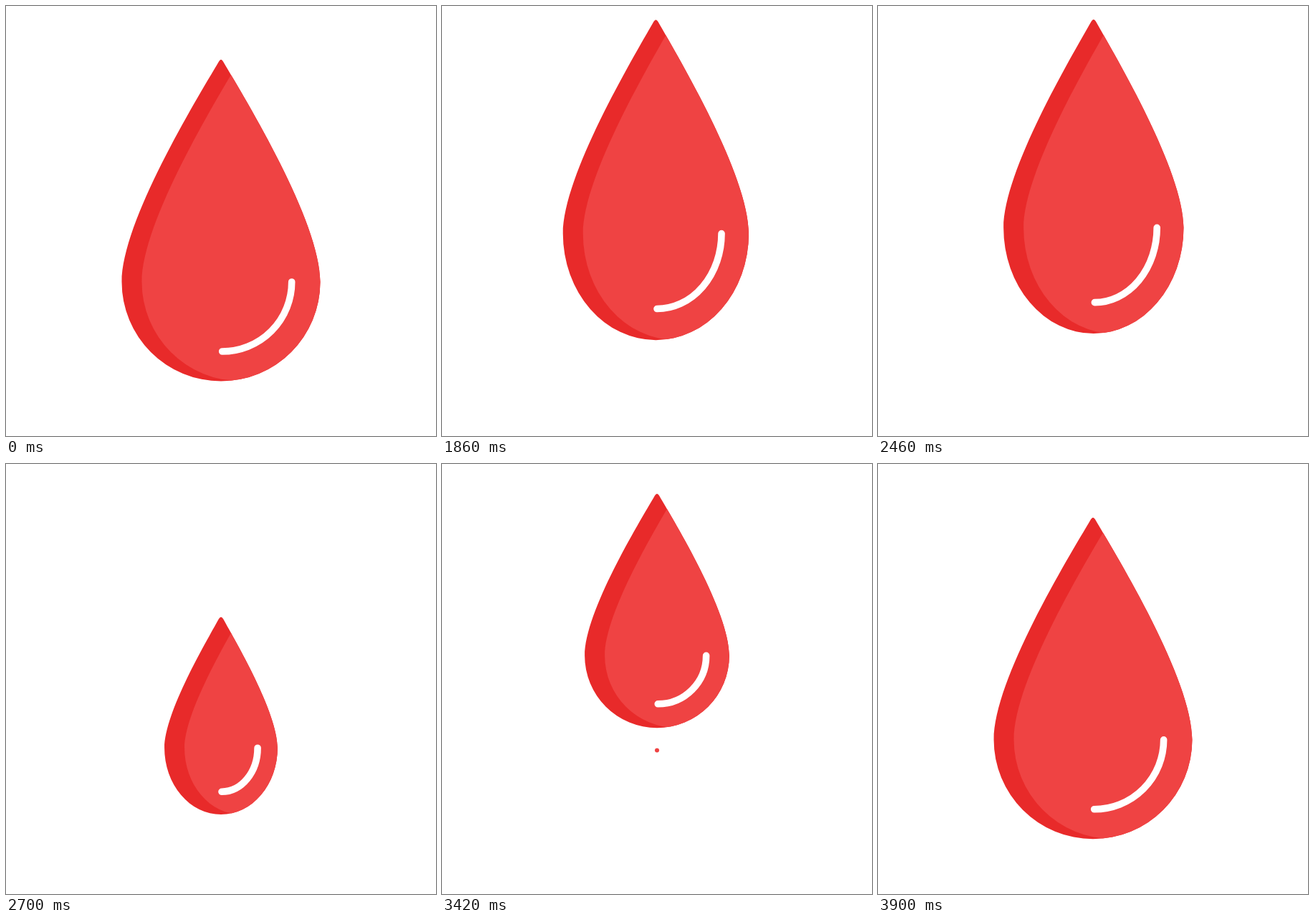
An HTML page with a canvas that plays this animation: 600 by 600 pixels, repeating every 3.93 s.

```html
<!DOCTYPE html>
<html lang="en">
<head>
<meta charset="utf-8">
<title>Drop</title>
<style>
  html, body { margin: 0; width: 100%; height: 100%; overflow: hidden; background: #fff; }
  canvas { display: block; width: 600px; height: 600px; }
</style>
</head>
<body>
<canvas id="stage" width="600" height="600"></canvas>
<script>
const ctx = document.getElementById('stage').getContext('2d');
const LOOP = 3930, STEP = 30;
const RED = '#ef4343', DARK = '#e82a2a';

// Poses: tip, widest level, bottom, half width
const REST = [75, 385, 523.5, 138.5];
const HIGH = [9, 305, 455.5, 128];
const GROUND = [543, 543, 543, 0];
const SKY = [-48, -48, -48, 0];

// Moves between poses, in steps
const MOVES = [
  { from: 50, to: 79, a: REST, b: HIGH, ease: bezier(.18, .27, .06, 1) },
  { from: 79, to: 94, a: HIGH, b: GROUND, ease: bezier(.9, 0, .9, 1) },
  { from: 106, to: 131, a: SKY, b: REST, ease: bezier(.2, .265, .1, 1) }
];

function bezier(x1, y1, x2, y2) {
  const at = (s, p, q) => 3 * p * s * (1 - s) ** 2 + 3 * q * s * s * (1 - s) + s ** 3;
  return x => {
    let lo = 0, hi = 1;
    for (let i = 0; i < 30; i++) {
      const mid = (lo + hi) / 2;
      if (at(mid, x1, x2) < x) lo = mid; else hi = mid;
    }
    return at((lo + hi) / 2, y1, y2);
  };
}

function poseAt(f) {
  if (f <= MOVES[0].from) return REST;
  const m = MOVES.find(m => f >= m.from && f < m.to);
  if (!m) return null;
  const p = m.ease((f - m.from) / (m.to - m.from));
  return m.a.map((v, i) => v + (m.b[i] - v) * p);
}

function outline([top, mid, bottom, half]) {
  const h = mid - top, tip = 3 * Math.min(1, half / 30);
  const y0 = top + tip * .8, y1 = top + h * .183, y2 = top + h * .728;
  const x1 = half * .253;
  const path = new Path2D();
  path.moveTo(-tip, y0);
  path.quadraticCurveTo(0, top - tip * .9, tip, y0);
  path.bezierCurveTo(x1, y1, half, y2, half, mid);
  path.ellipse(0, mid, half, bottom - mid, 0, 0, Math.PI);
  path.bezierCurveTo(-half, y2, -x1, y1, -tip, y0);
  path.closePath();
  return path;
}

function drawDrop(pose, x) {
  const [, mid, bottom, half] = pose;
  if (half < .5) return;
  const shape = outline(pose);
  ctx.save();
  ctx.translate(x, 0);
  ctx.fillStyle = DARK;
  ctx.fill(shape);
  ctx.save();
  ctx.clip(shape);
  ctx.translate(28, 0);
  ctx.fillStyle = RED;
  ctx.fill(shape);
  ctx.restore();

  const inset = r => 97 - .787 * (138.5 - r);
  const rx = inset(half), ry = inset(bottom - mid);
  if (rx > 4 && ry > 4) {
    ctx.beginPath();
    ctx.ellipse(1.7 * half / 138.5, mid, rx, ry, 0, 0, Math.PI / 2);
    ctx.strokeStyle = '#fff';
    ctx.lineWidth = 9.6;
    ctx.lineCap = 'round';
    ctx.stroke();
  }
  ctx.restore();
}

function ball(x, y, r) {
  if (r <= 0) return;
  ctx.beginPath();
  ctx.arc(x, y, r, 0, Math.PI * 2);
  ctx.fillStyle = RED;
  ctx.fill();
}

function drawSplash(f) {
  const t = f - 93;
  if (t < 0 || t > 23) return;
  const spread = 258 * (1 - (1 - t / 23) ** 4.14);
  const height = v => 515 - v * t + 1.443 * t * t;
  for (const side of [-1, 1]) ball(300 + side * spread, height(30.9), 29.5 - 1.45 * t);
  ball(300, height(35.8), 29.7 - 1.27 * t);
}

function shakeAt(f) {
  return f > 53 && f < 85 ? -1.6 * Math.cos((f - 62) * Math.PI / 3) : 0;
}

function render(ms) {
  const f = Math.floor((ms % LOOP) / STEP);
  ctx.fillStyle = '#fff';
  ctx.fillRect(0, 0, 600, 600);
  drawSplash(f);
  const pose = poseAt(f);
  if (pose) drawDrop(pose, 300 + shakeAt(f));
}

const start = performance.now();
function tick() {
  render(performance.now() - start);
  requestAnimationFrame(tick);
}
tick();
</script>
</body>
</html>
```
